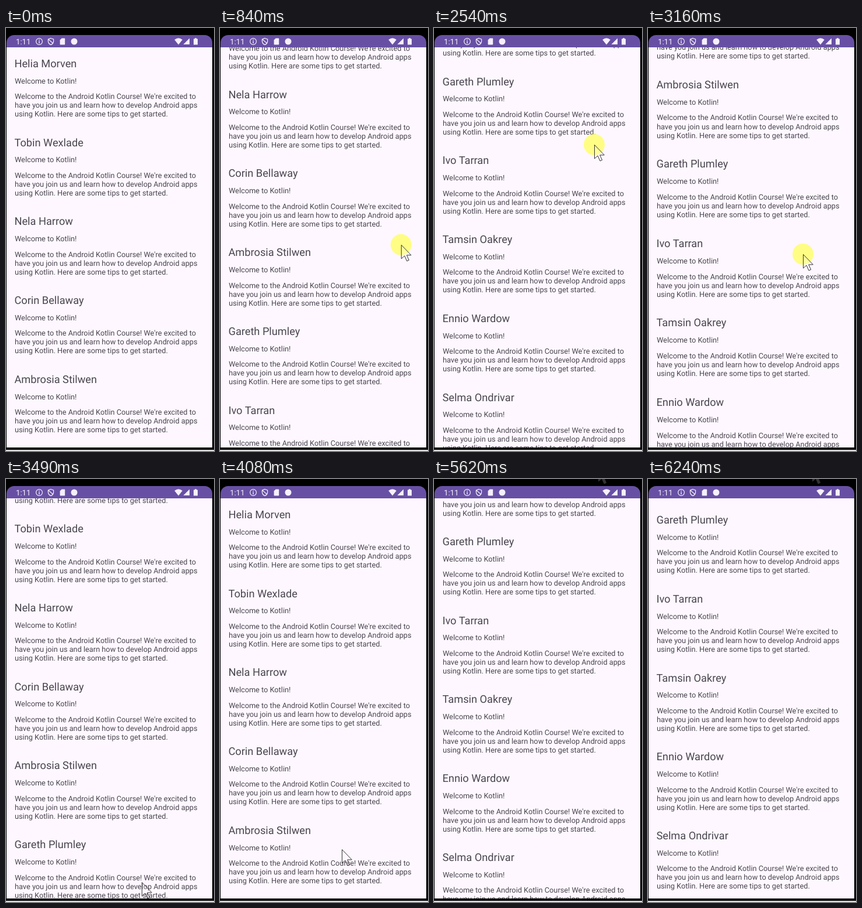
Recreate the animation shown at these times as an HTML page. Size 357 by 722 pixels, loop 6.84 s.

```html
<!DOCTYPE html>
<html lang="en">
<head>
<meta charset="utf-8">
<title>Scrolling message list</title>
<style>
  html, body { margin: 0; width: 100%; height: 100%; overflow: hidden; background: #000; }
  svg { display: block; width: 357px; height: 722px; font-family: Roboto, "Noto Sans", sans-serif; }
  text { text-rendering: geometricPrecision; }
  .list { fill: #49454f; font-size: 12.75px; }
  .name { font-size: 18.2px; }
  .line { fill: none; stroke: #f6f0fc; stroke-width: 1.2; }
  .light { fill: #f6f0fc; }
  #spot { fill: #ff6; opacity: .8; }
  #arrow { fill: #fff; fill-opacity: .2; stroke: #333; stroke-linejoin: round; }
</style>
</head>
<body>
<svg viewBox="0 0 357 722">
  <defs>
    <clipPath id="view"><rect x="1" y="33" width="353" height="683"/></clipPath>
  </defs>
  <rect width="357" height="722"/>
  <rect y="720" width="357" height="2" fill="#e2e0e3"/>
  <path d="M1 33V25A13 13 0 0 1 14 12H341A13 13 0 0 1 354 25V33Z" fill="#6750a4"/>
  <rect x="1" y="33" width="353" height="683" fill="#fef7ff"/>

  <g class="light">
    <text x="17" y="27.6" font-size="13.2">1:11</text>
    <circle class="line" cx="57" cy="23" r="5.4"/>
    <path d="M56.3 19.8h1.4v1.4h-1.4zM56.3 22.2h1.4v4h-1.4z"/>
    <path class="line" d="M77 17.5L81.6 19.2V22.6Q81.4 26.8 77 28.6Q72.6 26.8 72.4 22.6V19.2ZM73 19.5L81 26.5"/>
    <path d="M95.6 17.4H100.4Q101.2 17.4 101.2 18.2V27.8Q101.2 28.6 100.4 28.6H93.4Q92.6 28.6 92.6 27.8V20.6Z"/>
    <circle cx="117" cy="23" r="5.5"/>
    <path d="M289.2 19.9Q296 14.8 302.8 19.9L296 28.4Z"/>
    <path d="M315 17.4V28H304.4Z"/>
    <path d="M324 17.2H327V18.4H329V28.4H322V18.4H324Z"/>
  </g>

  <g clip-path="url(#view)"><g id="list" class="list"></g></g>

  <g id="pointer">
    <circle id="spot" r="18"/>
    <path id="arrow" d="M.5 .5V24L6 19L10 28L13.6 26.4L9.7 17.9H17.3Z"/>
  </g>
</svg>
<script>
const LOOP = 6840, STEP = 70;
const TOP = 33, PITCH = 134.75, LINE = 15;
const $ = id => document.getElementById(id);

const names = ["Helia Morven", "Tobin Wexlade", "Nela Harrow", "Corin Bellaway", "Ambrosia Stilwen",
  "Gareth Plumley", "Ivo Tarran", "Tamsin Oakrey", "Ennio Wardow", "Selma Ondrivar"];
const body = [
  "Welcome to the Android Kotlin Course! We're excited to",
  "have you join us and learn how to develop Android apps",
  "using Kotlin. Here are some tips to get started."
];
const LAST = names.length * PITCH - 683;

function addText(y, text, cls = "") {
  const el = document.createElementNS("http://www.w3.org/2000/svg", "text");
  el.setAttribute("x", cls ? 14.5 : 15);
  el.setAttribute("y", y);
  el.setAttribute("class", cls);
  el.textContent = text;
  $("list").append(el);
}
names.forEach((name, i) => {
  const y = 66.8 + i * PITCH;
  addText(y, name, "name");
  addText(y + 27.7, "Welcome to Kotlin!");
  body.forEach((text, row) => addText(y + 54.4 + row * LINE, text));
});

// Each move takes the pointer to (x, y); a drag pulls the list along, a fling lets it coast to `to`.
const linear = u => u;
const smooth = u => u * u * (3 - 2 * u);
const hover = (start, end, x, y) => ({ start, end, x, y, ease: smooth });
const drag = (start, end, x, y) => ({ start, end, x, y, ease: linear, pressed: true });
const fling = (start, end, x, y, to, power) => ({ start, end, x, y, ease: smooth, to, power });

const moves = [
  drag(180, 1240, 314, 222),
  drag(1440, 1790, 313, 120),
  hover(1980, 2120, 303, 375.5),
  drag(2120, 2540, 275, 199),
  fling(2540, 2680, 272, 225, LAST, 2),
  drag(2680, 3160, 266, 386),
  drag(3160, 3420, 235, 693),
  fling(3420, 3820, 209, 632, 0, 3),
  hover(4080, 4560, 252, 136),
  hover(4820, 5100, 191, 264),
  drag(5220, 5410, 282, -20),
  fling(5410, 6240, 282, -20, LAST, 8)
];

const ramp = (t, a, b) => Math.min(1, Math.max(0, (t - a) / (b - a)));

// The screen refreshes once per step within a move.
function progress(t, { start, end }) {
  const shown = start + Math.floor((t - start) / STEP) * STEP;
  return t >= end ? 1 : ramp(shown, start, end);
}

function pose(t) {
  let x = 306, y = 586.5, scroll = 0, pressed = false;
  for (const m of moves) {
    if (t < m.start + STEP) break;
    const u = progress(t, m), e = m.ease(u);
    const dy = (m.y - y) * e;
    x += (m.x - x) * e;
    y += dy;
    if (m.pressed) scroll -= dy;
    if (m.power) scroll += (m.to - scroll) * (1 - (1 - u) ** m.power);
    pressed = !!m.pressed;
  }
  return { x, y, scroll, pressed };
}

function draw() {
  const t = performance.now() % LOOP;
  const { x, y, scroll, pressed } = pose(t);
  // Overscroll stretches the list, then eases off during the drag back.
  const stretch = 1 + .017 * Math.min(ramp(t, 2540, 2680), 1 - ramp(t, 2680, 3420));
  $("list").setAttribute("transform",
    `translate(0 ${TOP}) scale(1 ${stretch}) translate(0 ${-TOP - scroll})`);
  $("pointer").setAttribute("transform", `translate(${x} ${y})`);
  $("pointer").style.display = t < 250 ? "none" : "";
  $("spot").style.display = pressed ? "" : "none";
  requestAnimationFrame(draw);
}
draw();
</script>
</body>
</html>
```
